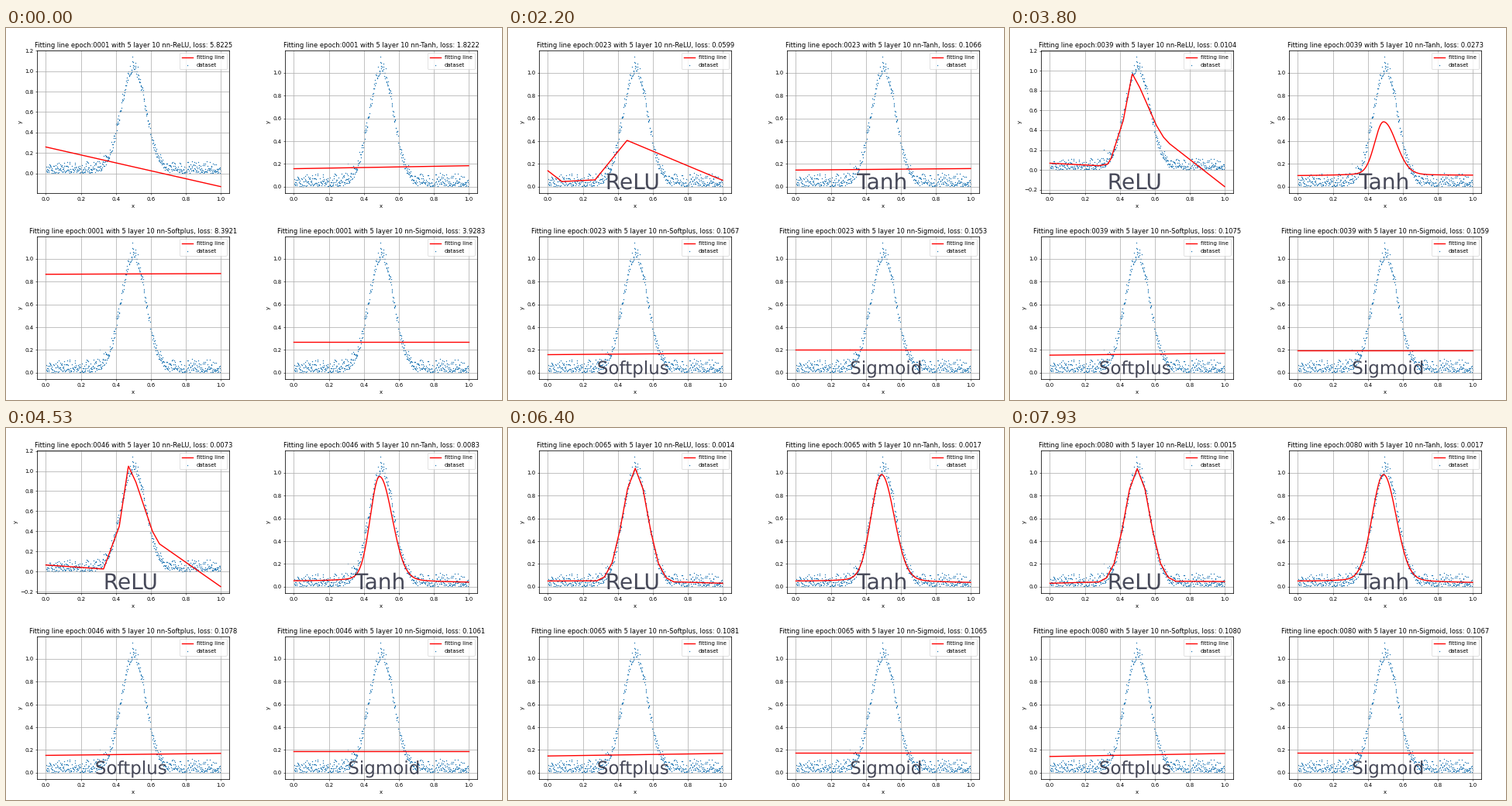
A matplotlib script that plays this animation: 640 by 480 pixels, repeating every 8000 ms.

```python
import numpy as np
import matplotlib.pyplot as plt
from matplotlib.animation import FuncAnimation
from matplotlib.textpath import TextPath
from matplotlib.transforms import Affine2D

plt.rcParams["font.family"] = "DejaVu Sans"

W, H, DPI = 640, 480, 50
EPOCHS, STEP_MS = 80, 100
X = np.linspace(0, 1, 401)
INK = (0.18, 0.19, 0.26)

KEY_EPOCHS = (1, 11, 23, 31, 46, 65, 80)
LOSSES = {
    "ReLU": (5.8225, .1075, .0599, .0157, .0073, .0014, .0015),
    "Tanh": (1.8222, .1069, .1066, .1062, .0083, .0017, .0017),
    "Softplus": (8.3921, .1069, .1067, .1071, .1078, .1081, .1080),
    "Sigmoid": (3.9283, .1048, .1053, .1056, .1061, .1065, .1067),
}


def bell(x):
    return np.exp(-((x - 0.5) / 0.07) ** 2 / 2)


def make_dataset(n=520):
    rng = np.random.default_rng(4)
    x = (np.arange(n) + rng.random(n)) / n
    y = bell(x) + 0.13 * rng.beta(1, 2, n)
    return np.append(x, (0.496, 0.31)), np.append(y, (1.14, 0.205))


DATA_X, DATA_Y = make_dataset()


def eased(epoch):
    """Training moves fast at first: hurry through the first stretch."""
    first, second = KEY_EPOCHS[:2]
    if epoch >= second:
        return epoch
    u = (epoch - first) / (second - first)
    return first + (second - first) * (1 - (1 - u) ** 4)


def loss_at(name, epoch):
    return np.exp(np.interp(eased(epoch), KEY_EPOCHS, np.log(LOSSES[name])))


# ---- the fitted line of each network
def ramp(a, b):
    return a + (b - a) * X


def poly(*points):
    return np.interp(X, *zip(*points))


def faceted_bell(left, right):
    knots = np.r_[0, np.linspace(.28, .72, 11), 1]
    return ramp(left, right) + np.interp(X, knots, bell(knots))


RELU_STAGES = np.array([
    ramp(.258, -.13),
    poly((0, .197), (.22, .195), (1, .11)),
    poly((0, .14), (.08, .045), (.27, .06), (.453, .407), (.945, .09), (1, .057)),
    poly((0, .07), (.28, .055), (.35, .11), (.47, .88), (.685, .3), (1, -.19)),
    poly((0, .065), (.33, .025), (.42, .45), (.472, 1.05), (.515, .89),
         (.61, .4), (.65, .275), (1, -.15)),
    faceted_bell(.05, .03),
    faceted_bell(.03, .045),
])


def relu(epoch):
    place = np.interp(eased(epoch), KEY_EPOCHS, range(len(KEY_EPOCHS)))
    i = min(int(place), len(RELU_STAGES) - 2)
    a, b = RELU_STAGES[i:i + 2]
    return a + (b - a) * (place - i)


def tanh(epoch):
    flat = ramp(.146, .15 + .0004 * epoch)
    flat = flat + ramp(.012, .034) * np.exp((1 - epoch) / 3)
    d = X - .49
    width = np.where(d < 0, .05 + .0005 * epoch, .1)
    tails = ramp(.045, .033) + .06 / (1 + (d / .15) ** 2)
    hump = tails + (.985 - tails) * np.exp(-(d / width) ** 2)
    grown = 1 / (1 + np.exp((39 - epoch) / 1.8))
    return flat + (hump - flat) * grown


def softplus(epoch):
    swing = .7 * np.exp((1 - epoch) / 3.3) * np.cos(.21 * (epoch - 1))
    start = .165 - .00028 * epoch + swing
    return ramp(start, start + .006 + .00025 * epoch)


def sigmoid(epoch):
    level = .155 + .077 * np.exp(-epoch / 55) + .04 * np.exp((1 - epoch) / 2)
    return ramp(level, level)


# ---- figure
fig = plt.figure(figsize=(W / DPI, H / DPI), dpi=DPI, facecolor="white")


class Panel:
    def __init__(self, name, fit, left, top):
        self.name, self.fit = name, fit
        self.ax = ax = fig.add_axes([left / W, 1 - (top + 184) / H,
                                     248 / W, 184 / H])
        self.line, = ax.plot(X, X, color="red", lw=2, label="fitting line")
        ax.scatter(DATA_X, DATA_Y, s=1, color="#1f77b4", label="dataset")
        ax.set(xlabel="x", ylabel="y", xlim=(-.05, 1.05))
        ax.grid(True, lw=1.1)
        for spine in ax.spines.values():
            spine.set_linewidth(1.1)
        ax.legend(loc="upper right")

    def update(self, epoch):
        y = self.fit(epoch)
        self.line.set_ydata(y)
        low, high = min(DATA_Y.min(), y.min()), DATA_Y.max()
        margin = .05 * (high - low)
        self.ax.set_ylim(low - margin, high + margin)
        self.ax.set_title(
            f"Fitting line epoch:{epoch:04d} with 5 layer 10 nn-{self.name}, "
            f"loss: {loss_at(self.name, epoch):.4f}")


class Caption:
    """A word filled with ink that sweeps in softly from left to right."""

    def __init__(self, ax, word, centre, baseline, em):
        path = TextPath((0, 0), word, size=em)
        box = path.get_extents()
        shift = Affine2D().translate(centre - (box.x0 + box.x1) / 2, baseline)
        path = path.transformed(shift)
        box = path.get_extents()
        self.pixels = np.ones((1, 64, 4))
        self.pixels[..., :3] = INK
        self.image = ax.imshow(
            self.pixels, aspect="auto", interpolation="bilinear",
            extent=(box.x0 - 1, box.x1 + 1, box.y0 - 1, box.y1 + 1))
        self.image.set_clip_path(path, ax.transData)

    def update(self, ms):
        place = np.linspace(0, 1, self.pixels.shape[1])
        fade = np.clip((ms - 60 - 400 * place) / 850, 0, 1)
        self.pixels[..., 3] = .88 * fade
        self.image.set_data(self.pixels)


panels = [Panel("ReLU", relu, 40.2, 29), Panel("Tanh", tanh, 360.2, 29),
          Panel("Softplus", softplus, 40.2, 269),
          Panel("Sigmoid", sigmoid, 360.2, 269)]

overlay = fig.add_axes([0, 0, 1, 1], zorder=5)
overlay.axis("off")
captions = [Caption(overlay, "ReLU", 161, H - 208, 28),
            Caption(overlay, "Tanh", 481.5, H - 208, 28),
            Caption(overlay, "Softplus", 161.5, H - 446.5, 23),
            Caption(overlay, "Sigmoid", 487.5, H - 446.5, 23)]
overlay.set(xlim=(0, W), ylim=(0, H))


def update(i):
    for panel in panels:
        panel.update(i + 1)
    for caption in captions:
        caption.update(i * STEP_MS)
    return []


anim = FuncAnimation(fig, update, frames=EPOCHS, interval=STEP_MS,
                     repeat=True, repeat_delay=0, blit=False)
plt.show()
```
